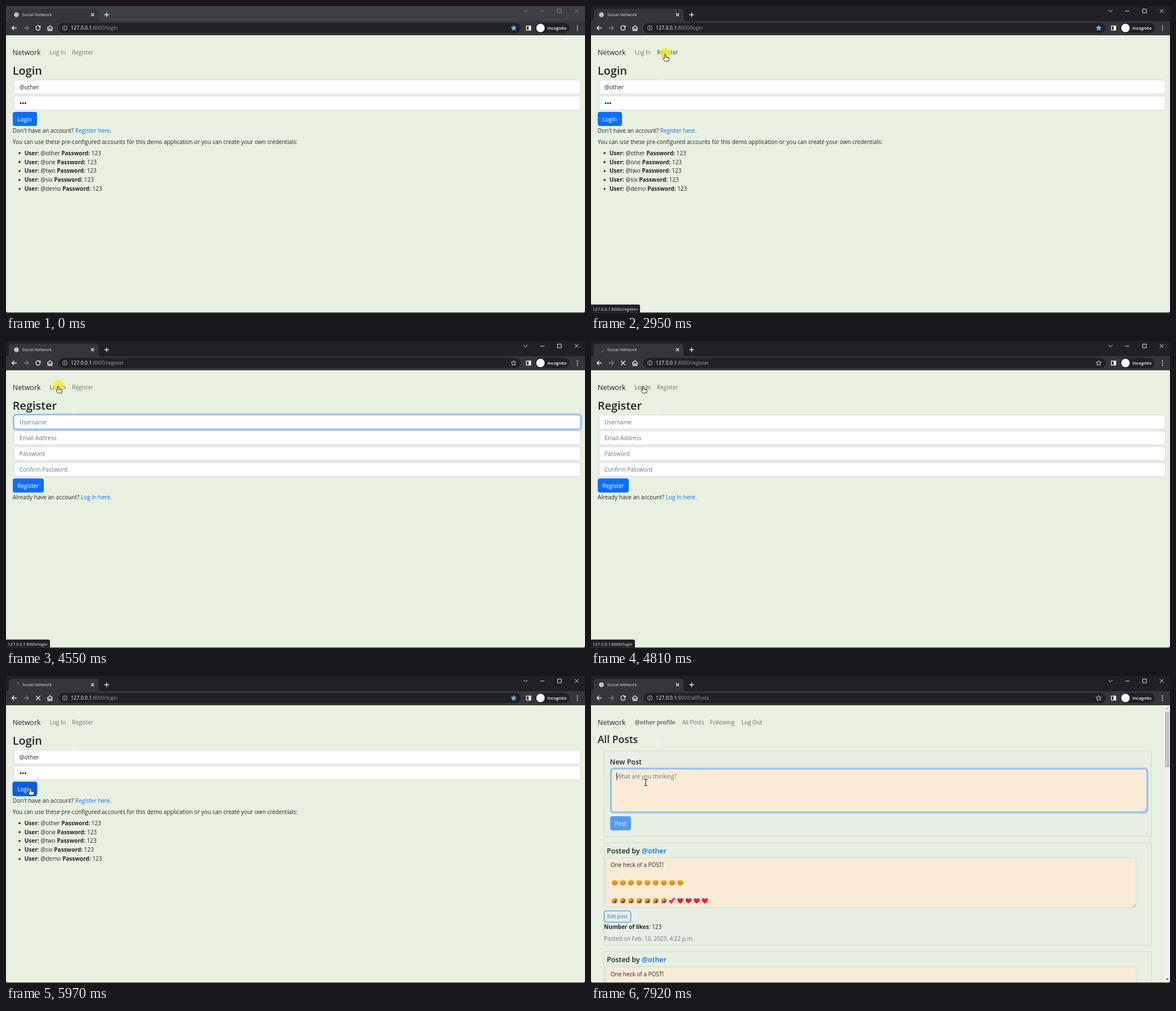
Animation, 1027 px wide and 545 px high, one loop 8 s. Source, as an HTML page:

```html
<!DOCTYPE html>
<html lang="en">
<head>
<meta charset="utf-8">
<title>Social Network</title>
<style>
  html, body { margin: 0; width: 100%; height: 100%; overflow: hidden; background: #e8f0e0; }
  svg { display: block; width: 100%; height: 100%; }
  text { font: 10.02px "Open Sans", "Noto Sans", sans-serif; fill: #212529; white-space: pre; }
  .h2 { font-size: 19.9px; font-weight: 600; }
  .h3 { font-size: 17.5px; font-weight: 600; }
  .h5 { font-size: 12.45px; font-weight: 600; }
  .brand { font-size: 12.5px; }
  .b { font-weight: 700; }
  .nav { fill: #6f746f; }
  .grey { fill: #6c757d; }
  .link { fill: #0d6efd; }
  .white { fill: #fff; }
  .small { font-size: 8.8px; }
  .url { font-size: 8.8px; fill: #9aa0a6; }
  .tab { font-size: 7.6px; fill: #dfe1e5; }
  .pill { font-size: 7.5px; font-weight: 600; fill: #fff; }
  .status { font-size: 7.47px; fill: #e8eaed; }
  .icon { fill: none; stroke: #f1f3f4; stroke-width: 1.3; }
  .field { fill: #fff; stroke: #ced4da; stroke-width: .8; }
  .cream { fill: #faebd7; }
  .card { fill: #e6efe1; stroke: #c9d2cb; stroke-width: .8; }
</style>
</head>
<body>
<svg id="stage" viewBox="0 0 1027 545"></svg>
<script>
const LOOP = 8000, STEP = 67.4;
const NAMES = ['@other', '@one', '@two', '@six', '@demo'];

// Drawing helpers
const text = (x, y, s, cls = '', id = '') => `<text x="${x}" y="${y}" class="${cls}" id="${id}">${s}</text>`;
const span = (s, cls) => `<tspan class="${cls}">${s}</tspan>`;
const rect = (x, y, w, h, r = 0, attrs = '') =>
  `<rect x="${x}" y="${y}" width="${w}" height="${h}" rx="${r}" ${attrs}/>`;
const path = (d, attrs = 'class="icon"') => `<path d="${d}" ${attrs}/>`;
const circle = (x, y, r, attrs = '') => `<circle cx="${x}" cy="${y}" r="${r}" ${attrs}/>`;
const group = (id, body, attrs = '') => `<g id="${id}" ${attrs}>${body}</g>`;
const button = (x, y, w, label, id = '', attrs = '') =>
  `<g ${attrs}>${rect(x, y, w, 25, 4, `id="${id}" fill="#0d6efd"`)}${text(x + 8.3, y + 16.5, label, 'white')}</g>`;
const ring = (id, x, y, w, h) => group(id,
  rect(x - 1.4, y - 1.4, w + 2.8, h + 2.8, 5, 'fill="none" stroke="#0d6efd" stroke-opacity=".3" stroke-width="2.8"') +
  rect(x, y, w, h, 4, 'fill="none" stroke="#86b7fe"'));
const inputBox = (y, id = '') => rect(14.5, y, 1004.5, 24.6, 4, `class="field" id="${id}"`);
const placeholder = (i, s) => text(23.7, 147.6 + i * 28.15, s, 'grey');
const grip = (x, y) => path(`M${x - 6} ${y - 1}l5-5M${x - 3} ${y - 1}l2-2`, 'fill="none" stroke="#777" stroke-width=".7"');
const area = (x, y, w, h) => rect(x, y, w, h, 4, 'class="field cream"') + grip(x + w, y + h);

// Emoji
const smile = x => `<g transform="translate(${x} 367)">` + circle(0, 0, 5.3, 'fill="#fbb126"') +
  circle(-3.2, 1, 1.3, 'fill="#f5783a"') + circle(3.2, 1, 1.3, 'fill="#f5783a"') +
  path('M-3.2-.8q1.1-1.7 2.2 0M1-.8q1.1-1.7 2.2 0M-2.4 1.9q2.4 2.3 4.8 0', 'fill="none" stroke="#6b3a12" stroke-width=".9"') + '</g>';
const laugh = x => `<g transform="translate(${x} 399) rotate(-35)">` + circle(0, 0, 5.2, 'fill="#fbb126"') +
  path('M-3 .6h6q-.5 3.4-3 3.4t-3-3.4z', 'fill="#7c2f16"') +
  path('M-3.4-2.2l2 1-2 .8M3.4-2.2l-2 1 2 .8', 'fill="none" stroke="#6b3a12" stroke-width=".8"') +
  circle(-4.4, 1.2, 1.4, 'fill="#3e9df0"') + circle(4.4, 1.2, 1.4, 'fill="#3e9df0"') + '</g>';
const heart = (x, y, k, fill) =>
  path('M0 5C-8-.5-5-5-2.5-4.6-1-4.4 0-3 0-2.6 0-3 1-4.4 2.5-4.6 5-5 8-.5 0 5z', `transform="translate(${x} ${y}) scale(${k})" fill="${fill}"`);
const row = (n, draw, x0 = 42) => Array.from({ length: n }, (_, i) => draw(x0 + i * 14.55)).join('');

// Pages
const account = (name, i) => circle(24, 261.3 + i * 15.85, 1.8, 'fill="#212529"') +
  text(32.7, 264.7 + i * 15.85, `${span('User:', 'b')} ${name} ${span('Password:', 'b')} 123`);

const loginPage = text(11.8, 121.5, 'Login', 'h2') +
  inputBox(131.5, 'loginUser') + ring('loginRing', 14.5, 131.5, 1004.5, 24.6) + text(23.7, 147.6, NAMES[0]) +
  inputBox(159.8) + [26, 30.2, 34.4].map(x => circle(x, 172.5, 1.55, 'fill="#212529"')).join('') +
  rect(10.7, 186.7, 45.6, 27.6, 5, 'id="buttonRing" fill="#3184fd" fill-opacity=".5"') +
  button(12, 188, 43, 'Login', 'loginButton') +
  text(11.8, 224.8, `Don't have an account? ${span('Register here.', 'link')}`) +
  text(11.8, 244.7, 'You can use these pre-configured accounts for this demo application or you can create your own credentials:') +
  NAMES.map(account).join('');

const registerPage = text(11.8, 121.5, 'Register', 'h2') +
  [0, 1, 2, 3].map(i => inputBox(131.5 + i * 28.15, i ? '' : 'newUser')).join('') +
  ring('registerRing', 14.5, 131.5, 1004.5, 24.6) +
  ['Username', 'Email Address', 'Password', 'Confirm Password'].map((s, i) => placeholder(i, s)).join('') +
  rect(23, 137, .9, 13, 0, 'id="userCaret" fill="#212529"') +
  button(12, 244, 55, 'Register') +
  text(11.8, 281, `Already have an account? ${span('Log In here.', 'link')}`);

const post = rect(23, 296, 971, 182, 0, 'class="card"') +
  text(28, 314.8, `Posted by ${span(NAMES[0], 'link')}`, 'h5') +
  area(26, 323, 941, 88) + text(34.7, 339.4, 'One heck of a POST!') +
  row(9, smile) + row(7, laugh) +
  heart(142.2, 400.4, .75, '#f0307a') + heart(146.8, 396.3, .5, '#f0307a') +
  row(4, x => heart(x, 399, 1, '#ea1c3c'), 158.4) +
  rect(23.4, 417, 47.2, 20, 3, 'fill="none" stroke="#0d6efd" stroke-width=".9"') +
  text(28.7, 430.4, 'Edit post', 'link small') +
  text(23, 449.3, `${span('Number of likes', 'b')}: 123`) +
  text(23, 469.6, 'Posted on Feb. 10, 2023, 4:22 p.m.', 'grey');

const postsPage = text(77.5, 86, `${NAMES[0]} profile`, 'nav b') +
  [[161.5, 'All Posts'], [211, 'Following'], [267, 'Log Out']].map(([x, s]) => text(x, 86, s, 'nav')).join('') +
  text(11.8, 119, 'All Posts', 'h3') +
  rect(23, 133, 971, 152, 0, 'class="card"') + text(33.6, 157.3, 'New Post', 'h5') +
  area(36.3, 165.3, 949.7, 75.8) + ring('postRing', 36.3, 165.3, 949.7, 75.8) +
  text(45, 181.8, 'What are you thinking?', 'grey') +
  rect(45, 171.5, .9, 13.5, 0, 'id="postCaret" fill="#212529"') +
  button(34, 249, 37, 'Post', '', 'opacity=".65"') +
  post + `<g transform="translate(0 193.2)">${post}</g>` +
  rect(1017, 52, 10, 492, 0, 'fill="#f1f1f1"') + rect(1018, 63, 8, 99, 0, 'fill="#c1c1c1"') +
  path('M1019.5 59l2.5-3 2.5 3z', 'fill="#a3a3a3"') + path('M1019.5 537l2.5 3 2.5-3z', 'fill="#505050"');

// Browser frame
const star = Array.from({ length: 10 }, (_, i) => {
  const a = i * Math.PI / 5, r = i % 2 ? 2.2 : 4.9;
  return `${(900.5 + r * Math.sin(a)).toFixed(1)} ${(39.3 - r * Math.cos(a)).toFixed(1)}`;
}).join('L');

const browser = rect(0, 0, 1027, 28, 0, 'id="titleBar"') +
  path('M0 27q5 0 5-5v-12q0-5 5-5h149q5 0 5 5v12q0 5 5 5z', 'fill="#35363a"') +
  rect(0, 27, 1027, 25, 0, 'fill="#35363a"') +
  circle(18.5, 15.5, 4.3, 'id="favicon" fill="#b9c4cf"') +
  path('M18.5 11.5a4 4 0 0 1 4 4', 'id="spinner" fill="none" stroke="#7c8086" stroke-width="1.1"') +
  text(28.7, 18.4, '', 'tab', 'tabTitle') +
  path('M151 13l5 5M156 13l-5 5M174.5 15.5h8M178.5 11.5v8') +
  group('controls', path('M918 7l3.5 3.5 3.5-3.5M947.5 9h7.5M978.5 5.5h6.5v6.5h-6.5zM1009 5.5l6.5 6.5M1015.5 5.5l-6.5 6.5', 'fill="none" stroke-width=".95"')) +
  path('M19 39h-8.5M14.5 35l-4 4 4 4') +
  path('M31.500 39h8.5M36 35l4 4-4 4', 'fill="none" stroke="#7f8286" stroke-width="1.3"') +
  group('reload', path('M60.200 36.600a4 4 0 1 0 .6 3.4') + path('M61.500 34.500v4h-4z', 'fill="#f1f3f4"')) +
  path('M53.300 35.300l7.4 7.4M60.700 35.300l-7.4 7.4', 'id="stop" class="icon"') +
  path('M73 39.500l5-4.700 5 4.700M74.500 38.500v5h2.500v-3h2v3h2.500v-5') +
  rect(93, 30, 820, 18, 9, 'fill="#202124"') +
  circle(104.500, 39, 4, 'fill="none" stroke="#c4c7cb" stroke-width=".9"') + path('M104.500 38.300v3M104.500 36.400v1', 'stroke="#c4c7cb"') +
  text(115, 42.3, span('127.0.0.1', 'white') + '<tspan id="urlTail"></tspan>', 'url') +
  path(`M${star}z`, 'id="star" stroke-width=".9" stroke-linejoin="round"') +
  rect(923, 35.500, 7.800, 7.300, 0, 'class="icon"') + rect(927, 35.500, 4, 7.300, 0, 'fill="#f1f3f4"') +
  rect(939, 30, 61, 18, 9, 'fill="#202124"') + circle(948, 39, 7.500, 'fill="#fff"') +
  text(960.500, 41.700, 'Incognito', 'pill') +
  [35.500, 39.200, 42.900].map(y => circle(1013.500, y, 1, 'fill="#f1f3f4"')).join('');

const hand = path('M-1.2 1Q0-.6 1.2 1V5.200L5.800 6.200Q7.300 6.700 6.900 8.600L6 12.600H-.6L-3.800 8.400Q-3.800 6.800-1.200 8z',
  'fill="#fff" stroke="#111" stroke-width=".9" stroke-linejoin="round"') + path('M2.600 5.600v2.300M4.600 6v2', 'stroke="#111" stroke-width=".6"');
const arrow = path('M0 0V11.300L2.600 8.900 4.300 12.800 6 12 4.300 8.300H8z', 'fill="#fff" stroke="#111" stroke-width=".8"');
const beamPath = 'M-3-5.500H-.8L0-5 .8-5.500H3M0-5V5M-3 5.500H-.8L0 5 .8 5.500H3';
const beam = path(beamPath, 'fill="none" stroke="#fff" stroke-width="2.600"') + path(beamPath, 'fill="none" stroke="#111" stroke-width="1.100"');

const stage = document.getElementById('stage');
stage.innerHTML = rect(0, 0, 1027, 545, 0, 'fill="#e8f0e0"') +
  text(11.8, 87, 'Network', 'brand') +
  group('guestNav', text(77.500, 86, 'Log In', 'nav', 'navLogin') + text(117, 86, 'Register', 'nav', 'navRegister')) +
  group('login', loginPage) + group('register', registerPage) + group('posts', postsPage) +
  `<ellipse id="smudge" cx="118.500" cy="121" rx="3" ry="5" fill="#edf1f1" transform="rotate(-20 118.500 121)"/>` +
  browser +
  group('status', path('', 'id="statusBox" fill="#202124"') + text(3.300, 540.500, '', 'status', 'statusText')) +
  path('M0 541q0 3 3 3h1021q3 0 3-3v4h-1027z', 'fill="#2d2f31"') +
  circle(0, 0, 9.800, 'id="click" fill="#f5ef1e" fill-opacity=".75"') +
  group('cursor', group('hand', hand) + group('arrow', arrow) + group('beam', beam));

const el = {};
stage.querySelectorAll('[id]').forEach(n => { if (n.id) el[n.id] = n; });

// Timing
const RUNS = [0, 320, 2210, 2820, 3420, 4550];
const PATH = [ // time, x, y of the pointer's hot spot
  [320, 777, 497], [1060, 38, 198], [2210, 38, 198], [2670, 131.500, 85.300],
  [3400, 131.500, 85.300], [3680, 92.500, 79.800], [4880, 92.500, 79.800], [5420, 42.500, 194.500],
  [5700, 43, 198], [6310, 43, 200], [6700, 43, 200], [7040, 50, 258], [7110, 50, 258],
  [7640, 97, 189], [8000, 97, 189]];
const NAV = [[77, 75, 30, 15], [117, 75, 38, 15]];
const HITS = {
  login: { hand: [...NAV, [12, 188, 43, 25]], beam: [[14, 131, 1005, 25], [14, 160, 1005, 25]] },
  register: { hand: NAV, beam: [0, 1, 2, 3].map(i => [14, 131 + 28 * i, 1005, 25]) },
  posts: { hand: [], beam: [[36, 165, 950, 76]] }
};
const CLICKS = [[2820, 3080], [4550, 4740], [5560, 5690], [7710, 7850]];
const LOADS = [[2940, 3140], [4610, 4810], [5690, 6970]];

const ramp = (t, from, to) => Math.min(1, Math.max(0, (t - from) / (to - from)));
const within = (t, [from, to]) => t >= from && t < to;
const inside = (x, y) => ([l, top, w, h]) => x >= l && x <= l + w && y >= top && y <= top + h;
const ease = p => p * p * (3 - 2 * p);
const set = (node, attrs) => { for (const k in attrs) node.setAttribute(k, attrs[k]); };
const show = (node, on) => set(node, { opacity: +on });
const label = (node, s) => { if (node.textContent !== s) node.textContent = s; };

function pointer(t) {
  const i = Math.max(1, PATH.findIndex(k => k[0] > t));
  const [a, b] = [PATH[i - 1], PATH[i]];
  const p = ease(ramp(t, a[0], b[0]));
  return [a[1] + (b[1] - a[1]) * p, a[2] + (b[2] - a[2]) * p];
}

function draw(time) {
  const start = RUNS.filter(r => r <= time).pop();
  const t = start + Math.floor((time - start) / STEP + .05) * STEP;
  const scene = t < 3080 ? 'login' : t < 4810 ? 'register' : t < 6230 ? 'login' : 'posts';
  const active = t >= 2820;
  const loading = LOADS.some(span => within(t, span));

  for (const name of ['login', 'register', 'posts']) el[name].style.display = name === scene ? '' : 'none';
  el.guestNav.style.display = scene === 'posts' ? 'none' : '';
  show(el.smudge, t >= 2880);

  set(el.titleBar, { fill: active ? '#202124' : '#3c4043' });
  set(el.controls, { stroke: active ? '#f1f3f4' : '#8b8e92' });
  show(el.favicon, !loading);
  show(el.spinner, loading);
  set(el.spinner, { transform: `rotate(${-t * .36 % 360} 18.500 15.500)` });
  show(el.reload, !loading);
  show(el.stop, loading);
  label(el.tabTitle, within(t, [6230, 6430]) ? '127.0.0.1:8000/allPosts' : 'Social Network');
  label(el.urlTail, ':8000/' + (scene === 'posts' ? 'allPosts' : scene));
  set(el.star, scene === 'login' ? { fill: '#6fb3ee', stroke: '#6fb3ee' } : { fill: 'none', stroke: '#e8eaed' });

  const target = t < 3550 ? 'register' : 'login';
  const edge = target === 'register' ? 87 : 78;
  label(el.statusText, '127.0.0.1:8000/' + target);
  set(el.statusBox, { d: `M0 530h${edge - 3}q3 0 3 3v12h-${edge}z` });
  show(el.status, active ? 1 - ramp(t, 5300, 5490) : 0);

  const hover = ramp(t, 1070, 1200) - ramp(t, 2300, 2430) + ramp(t, 5430, 5560);
  set(el.loginButton, { fill: `rgb(${13 - 2 * hover},${110 - 16 * hover},${253 - 38 * hover})` });
  show(el.buttonRing, ramp(t, 5560, 5700));
  show(el.loginRing, t < 4800 ? 0 : ramp(t, 4800, 4950) - ramp(t, 5560, 5710));
  set(el.loginUser, { style: within(t, [4800, 5560]) ? 'fill:#faebd7' : '' });
  show(el.registerRing, ramp(t, 3010, 3150) - ramp(t, 4560, 4700));
  set(el.newUser, { style: t < 4540 ? 'fill:#faebd7' : '' });
  show(el.userCaret, within(t, [3080, 3580]) || within(time, [4080, 4550]));
  show(el.postRing, ramp(t, 7710, 7900));
  show(el.postCaret, t >= 7710);

  const [x, y] = pointer(t), hit = inside(x, y);
  const kind = HITS[scene].hand.some(hit) ? 'hand' : HITS[scene].beam.some(hit) ? 'beam' : 'arrow';
  const over = NAV.findIndex(hit);
  el.navLogin.style.fill = over === 0 ? '#464a45' : '';
  el.navRegister.style.fill = over === 1 ? '#464a45' : '';
  for (const name of ['hand', 'arrow', 'beam']) el[name].style.display = name === kind ? '' : 'none';
  show(el.cursor, t >= 320);
  set(el.cursor, { transform: `translate(${x} ${y})` });
  show(el.click, CLICKS.some(span => within(t, span)));
  set(el.click, { cx: x + .5, cy: y - 1 });
}

const origin = performance.now();
function tick() {
  draw((performance.now() - origin) % LOOP);
  requestAnimationFrame(tick);
}
tick();
</script>
</body>
</html>
```
